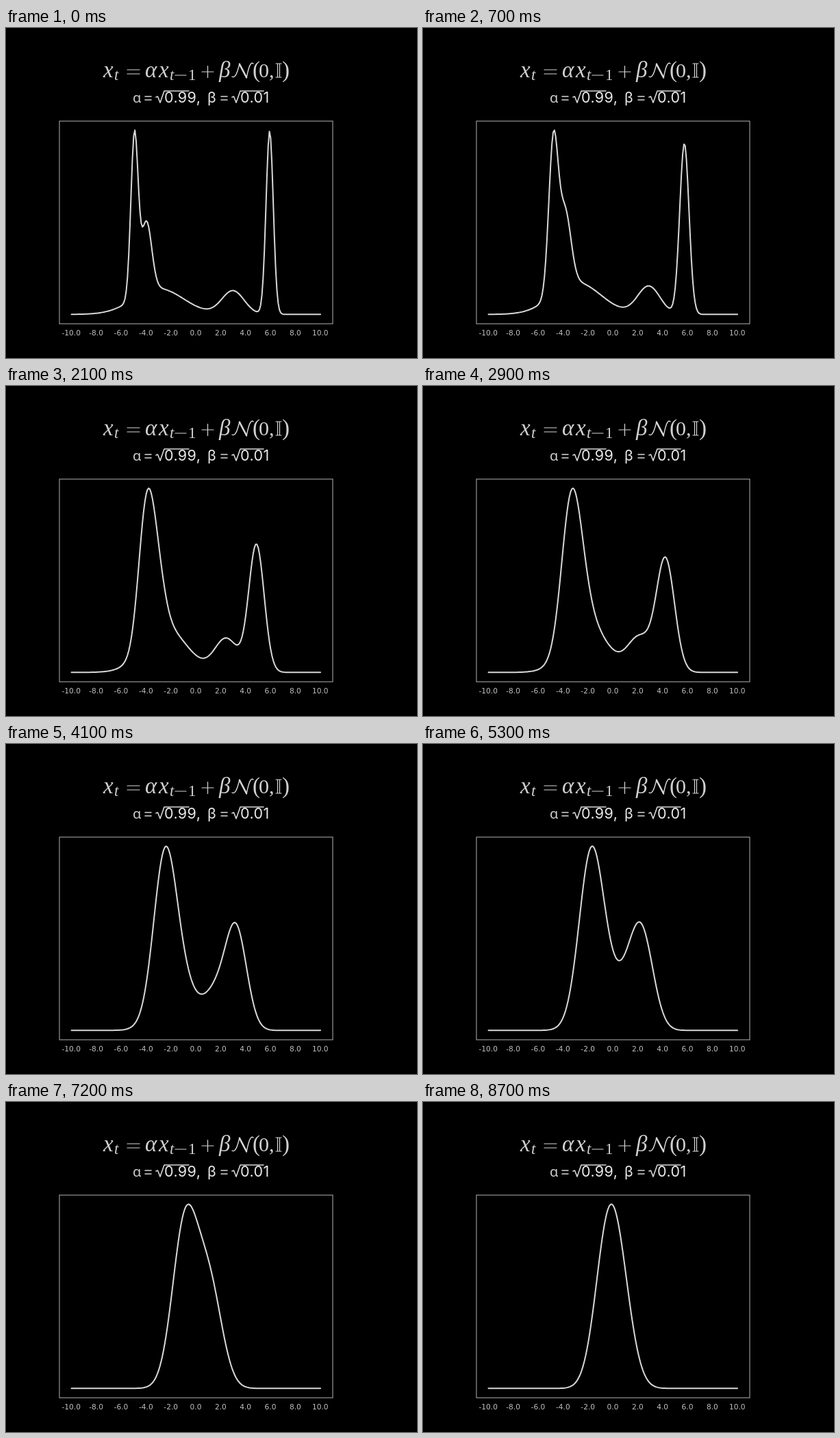
Animation of 600x482 px, one loop 8800 ms. Source, as an HTML page:

```html
<!DOCTYPE html>
<html lang="en">
<head>
<meta charset="utf-8">
<title>Diffusion of a density</title>
<style>
  html, body { margin: 0; width: 100%; height: 100%; overflow: hidden; background: #000; }
  svg { display: block; width: 600px; height: 482px; }
  .line { fill: none; stroke: #d8d8d8; stroke-linecap: round; stroke-linejoin: round; }
  .math { font: 30px "Liberation Serif", serif; fill: #d0d0d0; }
  .math .var { font-size: 33px; font-style: italic; }
  .math .sub { font-size: 23px; }
  .math .paren { font-size: 33px; }
  .params { font: 21.5px Inter, sans-serif; letter-spacing: 0.4px; fill: #e8e8e8; }
  .params .thin { font: 300 20px "Noto Sans", sans-serif; fill: #ccc; }
  .ticks { font: 10.6px "DejaVu Sans", sans-serif; fill: #c0c0c0; text-anchor: middle; }
</style>
</head>
<body>
<svg viewBox="0 0 600 482">
  <g class="math">
    <text class="var" x="142" y="72">x</text>
    <text class="var sub" x="158" y="76">t</text>
    <text class="var" x="203" y="72">α</text>
    <text class="var" x="223" y="72">x</text>
    <text class="var sub" x="239" y="76">t</text>
    <text class="sub" x="266" y="76">1</text>
    <text class="var" x="311" y="72">β</text>
    <text class="paren" x="360" y="72">(</text>
    <text x="369" y="72">0</text>
    <text x="384" y="72">,</text>
    <text class="paren" x="403" y="72">)</text>
  </g>
  <path class="line" stroke-width="1.2" d="M177 61H195M177 67H195M247 69H263M286 64H303M294.500 55.500V72.500
    M394 52H402M394 72H402M396.500 52V72M399.500 52V72"/>
  <path class="line" stroke-width="1.4" d="M330 71C335 74 338 64 341 52M351 73C353 65 354 57 357 53Q359 50 361 52"/>
  <path class="line" stroke-width="2.600" d="M341 53L351 72"/>

  <g class="params">
    <text class="thin" x="185" y="109">ɑ</text>
    <text x="231" y="109">0.99,</text>
    <text x="294" y="109">β</text>
    <text x="342" y="109">0.01</text>
  </g>
  <path class="line" stroke-width="1.6" d="M203 100H212M203 105H212M314 100H323M314 105H323
    M219 101L221.500 100L225 109L231 92H267M330 101L332.500 100L336 109L342 92H376"/>

  <rect x="78" y="136" width="399" height="296" fill="none" stroke="#b4b4b4"/>
  <g class="ticks" id="ticks"></g>
  <path class="line" id="curve" stroke-width="2"/>
</svg>
<script>
const FRAME_MS = 100, FRAMES = 88;
const ORIGIN = 277.3, UNIT = 18.175, BASE = 418.3, HEIGHT = 269;

// Gaussian mixture: mean, standard deviation, weight
const mixture = [
  [-4.94, 0.29, 0.257],
  [-3.98, 0.42, 0.16],
  [-3.00, 2.00, 0.28],
  [2.97, 0.90, 0.115],
  [5.92, 0.29, 0.289]
];
const curve = document.getElementById("curve");
const toX = value => ORIGIN + value * UNIT;

for (let value = -10; value <= 10; value += 2) {
  const label = document.createElementNS("http://www.w3.org/2000/svg", "text");
  label.setAttribute("x", toX(value) - 0.3);
  label.setAttribute("y", 448.5);
  label.textContent = value.toFixed(1);
  document.getElementById("ticks").append(label);
}

function density(value, scale) {
  return mixture.reduce((sum, [mean, sd, weight]) => {
    const variance = 1 + scale * scale * (sd * sd - 1);
    const offset = value - mean * scale;
    return sum + weight / Math.sqrt(variance) * Math.exp(-offset * offset / (2 * variance));
  }, 0);
}

function draw(now) {
  const frame = Math.floor(now / FRAME_MS) % FRAMES;
  // Means shrink by sqrt(0.99) per step; the steps speed up over time.
  const steps = 0.2435 * frame ** 1.67;
  const scale = 0.99 ** (steps / 2);
  const values = Array.from({ length: 201 }, (_, i) => i / 10 - 10);
  const heights = values.map(value => density(value, scale));
  const peak = Math.max(...heights);
  curve.setAttribute("d", "M" + values.map((value, i) =>
    toX(value).toFixed(2) + " " + (BASE - HEIGHT * heights[i] / peak).toFixed(2)).join("L"));
}

const start = performance.now();
function tick() {
  draw(performance.now() - start);
  requestAnimationFrame(tick);
}
tick();
</script>
</body>
</html>
```
